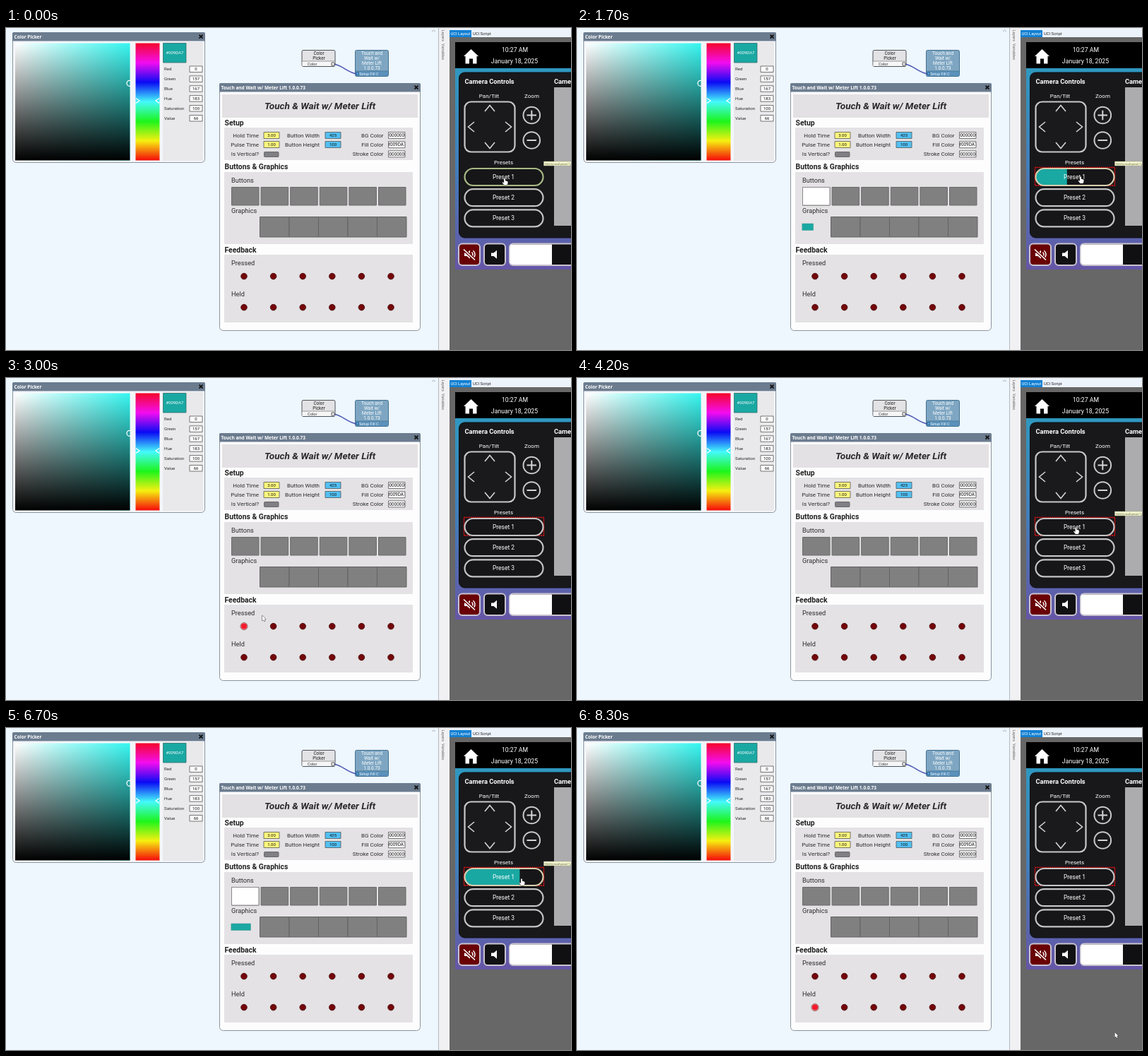
These frames come from a looping animation (800x456 px, 8.4 s). An HTML page with a canvas:

```html
<!DOCTYPE html>
<html lang="en">
<head>
<meta charset="utf-8">
<title>Gauge button demo</title>
<style>
html, body { margin: 0; width: 100%; height: 100%; overflow: hidden; background: #eef6fe; }
canvas { display: block; width: 800px; height: 456px; }
</style>
</head>
<body>
<canvas id="stage" width="800" height="456"></canvas>
<script>
const LOOP = 8400, STEP = 100, HOLD = 3000, PULSE = 1000;
const TEAL = '#1aa8a3', PANEL = '#e4e2e4';
const stage = document.getElementById('stage');
const base = document.createElement('canvas');
base.width = 800;
base.height = 456;
let g = base.getContext('2d');

function box(x, y, w, h, fill, stroke, line = 1, r = 0) {
  g.beginPath();
  g.roundRect(x, y, w, h, r);
  if (fill) { g.fillStyle = fill; g.fill(); }
  if (stroke) { g.strokeStyle = stroke; g.lineWidth = line; g.stroke(); }
}

function disc(x, y, r, fill, stroke, line = 1) {
  g.beginPath();
  g.arc(x, y, r, 0, Math.PI * 2);
  if (fill) { g.fillStyle = fill; g.fill(); }
  if (stroke) { g.strokeStyle = stroke; g.lineWidth = line; g.stroke(); }
}

function text(s, x, y, size, color = '#2c2c2c', align = 'left', style = '', family = 'Roboto') {
  g.font = `${style} ${size}px ${family}, sans-serif`;
  g.fillStyle = color;
  g.textAlign = align;
  g.fillText(s, x, y);
}

function trace(pts, close) {
  g.beginPath();
  for (let i = 0; i < pts.length; i += 2) g.lineTo(pts[i], pts[i + 1]);
  if (close) g.closePath();
}

function line(pts, color, width) {
  trace(pts);
  g.strokeStyle = color;
  g.lineWidth = width;
  g.stroke();
}

function poly(pts, color) {
  trace(pts, true);
  g.fillStyle = color;
  g.fill();
}

function ramp(x0, y0, x1, y1, colors) {
  const grad = g.createLinearGradient(x0, y0, x1, y1);
  colors.forEach((c, i) => grad.addColorStop(i / (colors.length - 1), c));
  return grad;
}

function field(s, x, y, w, h, fill, size = 6) {
  box(x + .5, y + .5, w - 1, h - 1, fill, '#555', .8);
  g.save();
  g.beginPath();
  g.rect(x + 1, y, w - 2, h);
  g.clip();
  text(s, x + w / 2, y + h / 2 + 2.2, size, '#111', 'center');
  g.restore();
}

function cross(x, y) {
  line([x - 2.5, y - 2.5, x + 2.5, y + 2.5], '#111', 1.8);
  line([x + 2.5, y - 2.5, x - 2.5, y + 2.5], '#111', 1.8);
}

function windowFrame(title, x, y, w, h, bg) {
  box(x + .5, y + .5, w - 1, h - 1, bg, '#8b959f', 1, [2, 2, 5, 5]);
  box(x, y, w, 12.5, '#6c7c8f', null, 1, [2, 2, 0, 0]);
  text(title, x + 2.5, y + 9, 6.5, '#fff', 'left', 'bold', '"Open Sans"');
  cross(x + w - 6, y + 6.2);
}

function colorPicker() {
  windowFrame('Color Picker', 9, 6, 273, 185, '#f4f6f9');
  box(222, 20, 57, 168, '#e9e8ea');
  box(13, 21.5, 162.5, 166, ramp(13, 0, 175.5, 0, ['#fff', '#36f6f0']));
  box(13, 21.5, 162.5, 166, ramp(0, 21.5, 0, 187.5, ['rgba(0,0,0,0)', '#000']));
  g.save();
  g.beginPath();
  g.rect(13, 21, 163, 167);
  g.clip();
  disc(175, 78.3, 4, null, '#fff', 1.3);
  g.restore();
  box(183.5, 21.5, 34, 166, ramp(0, 21.5, 0, 187.5,
    ['#f5082a', '#f40cf0', '#0a0af5', '#44fafa', '#1cf51c', '#f6f010', '#f50a0a']));
  line([184, 99.5, 189, 103, 184, 106.5], '#fff', 1.2);
  line([217, 99.5, 212, 103, 217, 106.5], '#fff', 1.2);
  box(222.5, 21.5, 32.5, 27.5, TEAL, '#34706f', .8);
  text('#009DA7', 239, 37, 6, '#fff', 'center');
  const rows = [['Red', 0], ['Green', 157], ['Blue', 167], ['Hue', 183], ['Saturation', 100], ['Value', 66]];
  rows.forEach(([name, value], i) => {
    const y = 58.2 + i * 13.9;
    text(name, 224, y + 2.2, 6.2);
    field(value, 259.5, y - 4.7, 19, 9.5, '#fff');
  });
}

function nodes() {
  box(419, 31.5, 47, 23, '#e3e3e5', '#4d5358', 1, 2);
  box(419.5, 47, 46, 7, '#f6f6f6');
  line([419, 47, 466, 47], '#777', .7);
  text('Color', 443, 38, 6.4, '#222', 'center');
  text('Picker', 443, 45, 6.4, '#222', 'center');
  text('Color', 427, 53, 5.6, '#333');
  box(494.5, 31.5, 47, 37, '#7ea6c2', '#42718f', 1, 2);
  box(495, 61, 46, 7, '#5b91bb');
  line([495, 61, 541, 61], '#42718f', .7);
  ['Touch and', 'Wait w/', 'Meter Lift', '1.0.0.73'].forEach((s, i) =>
    text(s, 518, 38.3 + i * 7, 6.5, '#fff', 'center'));
  text('Setup Fill C', 500, 67, 5.5, '#eaf6ff');
  g.beginPath();
  g.moveTo(463, 51);
  g.bezierCurveTo(477, 52, 483, 64, 498, 65);
  g.strokeStyle = '#4b57b4';
  g.lineWidth = 1.5;
  g.stroke();
  box(461, 49, 4, 4, '#fff', '#333', .8);
  box(496, 63, 3.5, 3.5, '#4fa5ee', '#245', .6);
}

function led(i, y, lit) {
  const x = 337 + i * 41.6;
  if (!lit) return disc(x, y, 4.3, '#74060a', '#4a1012', .9);
  disc(x, y, 5.1, '#e2a9ad', '#8c5054', .8);
  disc(x, y, 4, '#f5192c');
}

function mainWindow() {
  windowFrame('Touch and Wait w/ Meter Lift 1.0.0.73', 302, 78, 285, 351, '#fdfdfe');
  box(306, 94, 277, 33, '#e3e1e3');
  text('Touch & Wait w/ Meter Lift', 444.5, 115.3, 13.6, '#2b2b2b', 'center', 'italic bold');
  [['Setup', 138, 141, 46], ['Buttons & Graphics', 200, 204, 102], ['Feedback', 318, 321, 96]]
    .forEach(([name, ty, y, h]) => {
      text(name, 309.5, ty, 10.4, '#222', 'left', 'bold');
      box(309, y, 267, h, PANEL);
    });

  const label = (s, x, y) => text(s, x, y, 8, undefined, 'right');
  label('Hold Time', 358, 154.8);
  label('Pulse Time', 358, 168);
  label('Is Vertical?', 358, 181.2);
  label('Button Width', 444, 154.8);
  label('Button Height', 444, 168);
  label('BG Color', 534.5, 154.8);
  label('Fill Color', 534.5, 168);
  label('Stroke Color', 534.5, 181.2);
  field('3.00', 364.5, 147, 23, 10, '#fdf87c');
  field('1.00', 364.5, 160, 23, 10, '#fdf87c');
  field('425', 451.5, 147, 23, 10, '#52c0f3');
  field('100', 451.5, 160, 23, 10, '#52c0f3');
  box(365.5, 175.5, 20.5, 7, '#808084', '#68686c', 1, 1);
  ['00000000', '#009DA7', '00000000'].forEach((s, i) => field(s, 541, 147 + i * 13.2, 24.5, 10, '#fff', 6.4));

  text('Buttons', 319, 218.6, 9.2);
  text('Graphics', 319, 262.4, 9.2);
  text('Pressed', 319, 336, 9.2);
  text('Held', 319, 380, 9.2);
  for (let i = 0; i < 6; i++) {
    box(319.5 + i * 41.6, 225.5, 38.5, 25.5, '#808080', '#6a6a6a');
    if (i) box(318 + i * 41.5, 267.5, 41.5, 28.5, '#808080', '#626262');
    led(i, 351.6, false);
    led(i, 395.6, false);
  }
}

function speaker(x, y) {
  poly([x - 5, y - 2.3, x - 1.5, y - 2.3, x + 3, y - 6, x + 3, y + 6, x - 1.5, y + 2.3, x - 5, y + 2.3], '#fff');
}

function preset(n, fill = 0, stroke = '#c4c4c4') {
  const y = 169.8 + n * 29.2;
  box(649.5, y, 111, 24, '#161618', null, 1, 12);
  if (fill > 0) {
    g.save();
    g.clip();
    box(649, y, 112 * fill, 24, TEAL);
    g.restore();
  }
  box(649.5, y, 111, 24, null, stroke, 2.2, 12);
  text('Preset ' + n, 704.5, y + 14.6, 8.5, '#fff', 'center');
}

function sidePanel() {
  box(612, 0, 16, 456, '#f1f1f3');
  line([612.5, 0, 612.5, 456], '#b4b9c0', 1);
  line([603, 5, 605.5, 3, 608, 5], '#999', .8);
  [['Layers', 2.5], ['Variables', 22]].forEach(([s, y]) => {
    g.save();
    g.translate(617, y);
    g.rotate(Math.PI / 2);
    text(s, 0, 0, 5.6, '#666');
    g.restore();
  });
  box(628, 0, 172, 13, '#edf3fb');
  box(628, 13, 172, 443, '#676767');
  box(628, 3, 31, 10, '#1380d3');
  text('UCI Layout', 643.5, 10, 5.8, '#fff', 'center');
  text('UCI Script', 661, 10, 5.8, '#222');
}

function mutedSpeaker() {
  const red = '#690004';
  box(641, 305.5, 30, 30.5, red, '#c9c3cf', 2, 5);
  speaker(654, 320.7);
  for (const r of [4, 7]) {
    g.beginPath();
    g.arc(657, 320.7, r, -.9, .9);
    g.strokeStyle = '#fff';
    g.lineWidth = 1.5;
    g.stroke();
  }
  line([648, 313.5, 664, 328.5], red, 4);
  line([648, 313.5, 664, 328.5], '#fff', 1.7);
}

function device() {
  box(636, 57, 164, 285, ramp(0, 57, 0, 342, ['#2f98c0', '#437dba', '#6656a6']));
  box(636, 20, 164, 37, '#000');
  poly([658.5, 30, 669, 40, 666.5, 40, 666.5, 50.5, 661, 50.5, 661, 43.5, 656, 43.5, 656, 50.5,
    650.5, 50.5, 650.5, 40, 648, 40], '#fff');
  text('10:27 AM', 720.5, 34, 8.7, '#fff', 'center');
  text('January 18, 2025', 720, 50, 8.7, '#fff', 'center');

  box(641.5, 63, 170, 234, '#18181b', '#0d0d10', 1, 8);
  text('Camera Controls', 649.5, 78.6, 9.3, '#fff', 'left', 'bold');
  text('Camera', 776, 78.6, 9.3, '#fff', 'left', 'bold');
  box(776, 84, 24, 196, '#acacae');
  text('Pan/Tilt', 684, 98.5, 8, '#fff', 'center');
  text('Zoom', 744.5, 98.5, 8, '#fff', 'center');
  text('Presets', 704.5, 193, 8, '#fff', 'center');

  box(649.5, 104.5, 71, 71, '#1a1a1c', '#c8c8c8', 2.2, 9);
  for (let i = 0; i < 4; i++) {
    g.save();
    g.translate(685, 140);
    g.rotate(i * Math.PI / 2);
    line([-7, -22, 0, -30.5, 7, -22], '#d4d4d4', 1.6);
    g.restore();
  }
  [123.5, 159].forEach((y, i) => {
    disc(744.3, y, 11.8, '#1a1a1c', '#c8c8c8', 2);
    line([737.5, y, 751, y], '#d4d4d4', 2);
    if (!i) line([744.3, y - 6.8, 744.3, y + 6.8], '#d4d4d4', 2);
  });
  preset(2);
  preset(3);

  mutedSpeaker();
  box(677, 305.5, 30, 30.5, '#111114', '#c9c3cf', 2, 5);
  speaker(692, 320.7);
  box(713, 305.5, 110, 30.5, '#101012', '#c9c3cf', 2, 5);
  box(713.5, 306.5, 59.5, 28.5, '#fff', null, 1, [4, 0, 0, 4]);
}

// Press intervals: start, release
const presses = [[500, 2300], [4600, 7800]];
// Pointer keys: time, x, y
const path = [
  [0, 706, 213], [500, 706, 213], [1700, 713, 210.5], [2300, 713, 210.5], [2800, 363, 336.5],
  [3300, 363, 336.5], [3900, 706, 211.5], [4600, 707, 211.5], [5500, 721, 211.5], [6700, 730, 213.5],
  [7900, 732, 214], [8200, 761.5, 431], [LOOP, 761.5, 431]
];

function pointerAt(t) {
  const i = path.findIndex(k => k[0] > t);
  const [t0, x0, y0] = path[i - 1], [t1, x1, y1] = path[i];
  const u = (t - t0) / (t1 - t0);
  const e = Math.hypot(x1 - x0, y1 - y0) > 50 ? u * u * (3 - 2 * u) : u;
  return [x0 + (x1 - x0) * e, y0 + (y1 - y0) * e];
}

function pointer(x, y, hand) {
  g.save();
  g.translate(x, y);
  trace(hand
    ? [-.9, .4, 0, -.3, .9, .4, .9, 3.3, 3.8, 4, 4.6, 5, 4.2, 8, 3.4, 9.6, -.6, 9.6, -3.4, 5.8, -2.6, 5.2, -.9, 6.5]
    : [0, 0, 0, 7.2, 1.6, 5.8, 2.7, 8.3, 3.9, 7.8, 2.9, 5.3, 4.9, 5.2], true);
  g.fillStyle = '#fff';
  g.strokeStyle = '#222';
  g.lineWidth = .9;
  g.lineJoin = 'round';
  g.stroke();
  g.fill();
  g.restore();
}

function render(t) {
  g.drawImage(base, 0, 0);
  const press = presses.find(([a, b]) => t >= a && t < b);
  const level = press ? Math.min(1, (t - press[0]) / HOLD) : 0;
  const [x, y] = pointerAt(t);
  const hover = x > 649 && x < 761 && y > 198 && y < 223;
  const focused = t >= presses[0][0];

  if (focused) {
    g.setLineDash([2, 1]);
    box(648.5, 197.5, 113, 25.5, null, '#f01010', 1.4);
    g.setLineDash([]);
  }
  preset(1, level, press ? '#d6cfae' : hover && !focused ? '#a9ba86' : '#c4c4c4');
  if (hover) {
    box(761.5, 189, 45, 6, '#f4f5cf', '#a9ab80', .5);
    text('Hold to recall preset 1 position', 763, 193.5, 3.6, '#5b6340');
  }
  if (press) {
    box(319.5, 225.5, 38.5, 25.5, '#fff', '#8a8a8a');
    if (level > 0) box(318.8, 277, 39.5 * level, 9.5, TEAL, '#4f9f9b', .6);
  }

  const shortEnd = presses[0][1], heldAt = presses[1][0] + HOLD;
  if (t >= shortEnd && t < shortEnd + PULSE) led(0, 351.6, true);
  if (t >= heldAt && t < heldAt + PULSE) led(0, 395.6, true);
  pointer(x, y, hover);
}

box(0, 0, 800, 456, '#eef6fe');
colorPicker();
nodes();
mainWindow();
sidePanel();
device();

g = stage.getContext('2d');
const start = performance.now();
function tick() {
  const t = (performance.now() - start) % LOOP;
  render(Math.floor(t / STEP) * STEP);
  requestAnimationFrame(tick);
}
tick();
</script>
</body>
</html>
```
